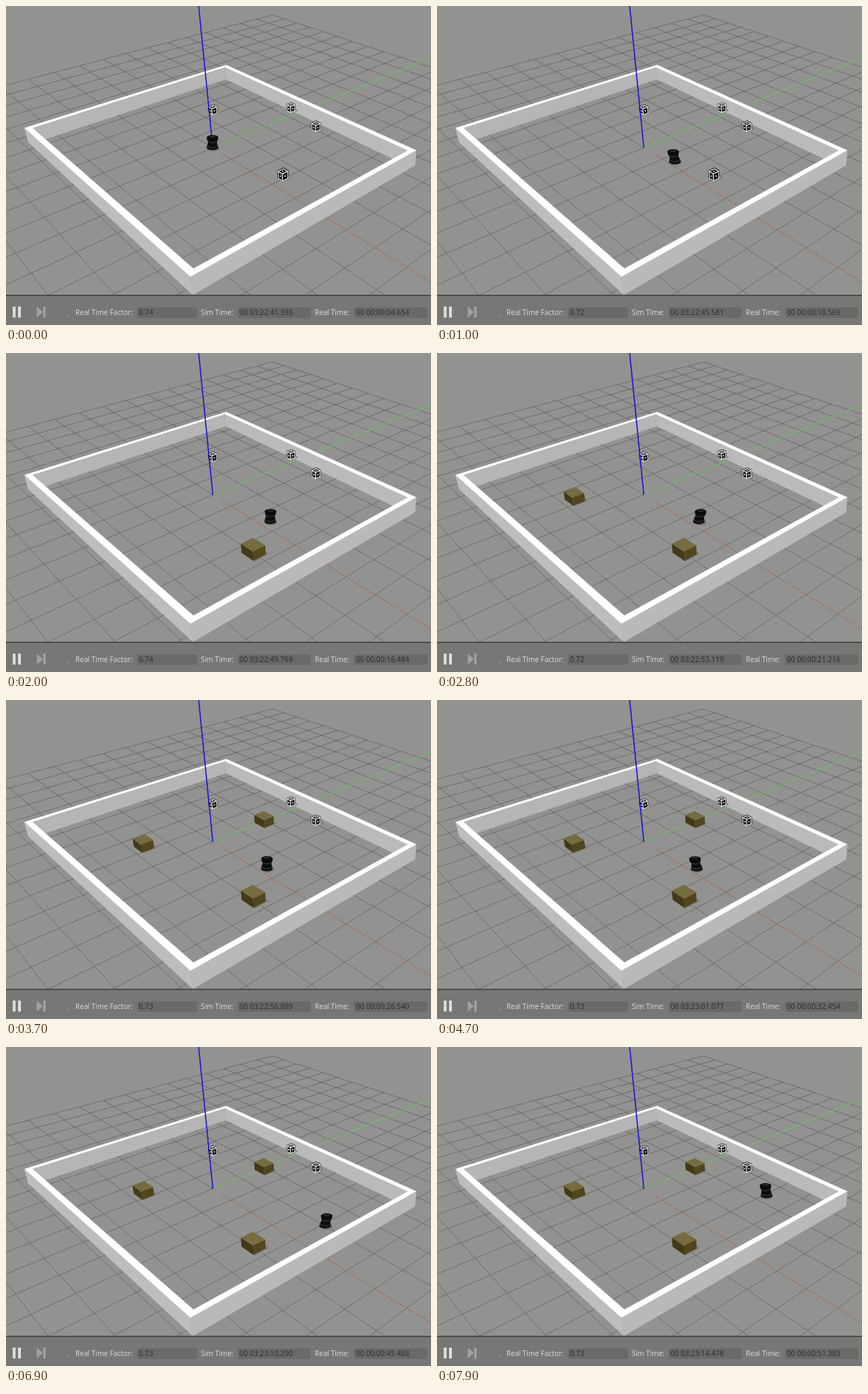
Write an HTML page with a canvas that moves like this. It is 600 px wide and 450 px high and loops after 8000 ms.

```html
<!DOCTYPE html>
<html lang="en">
<head>
<meta charset="utf-8">
<style>
html, body { margin: 0; width: 100%; height: 100%; overflow: hidden; background: #929290; }
canvas { display: block; }
</style>
</head>
<body>
<canvas id="stage" width="600" height="450"></canvas>
<script>
const ctx = document.getElementById('stage').getContext('2d');
const LOOP = 8000, STEP = 100;

// World metres to stage pixels: a perspective given by three vanishing points.
function project([x, y, z = 0]) {
  const p = -.0334 * x, q = .0352 * y, r = -.034 * z, w = 1 + p + q + r;
  return [
    (292 - 459 * p + 1407 * q + 450 * r) / w,
    (200 - 262 * p - 259 * q + 1780 * r) / w
  ];
}

function trace(points) {
  points.map(project).forEach(([x, y], i) => i ? ctx.lineTo(x, y) : ctx.moveTo(x, y));
}

function face(points, fill, edge) {
  ctx.beginPath();
  trace(points);
  ctx.closePath();
  ctx.fillStyle = fill;
  ctx.fill();
  if (edge) {
    ctx.strokeStyle = edge;
    ctx.lineWidth = 1.1;
    ctx.stroke();
  }
}

function line(color, width, ...points) {
  ctx.beginPath();
  trace(points);
  ctx.strokeStyle = color;
  ctx.lineWidth = width;
  ctx.stroke();
}

function ellipse(color, x, y, rx, ry) {
  ctx.fillStyle = color;
  ctx.beginPath();
  ctx.ellipse(x, y, rx, ry, 0, 0, 7);
  ctx.fill();
}

function rect(color, ...box) {
  ctx.fillStyle = color;
  ctx.fillRect(...box);
}

const ring = (x0, x1, y0, y1, z) => [[x0, y0, z], [x0, y1, z], [x1, y1, z], [x1, y0, z]];
const wallX = (x, y0, y1, z) => [[x, y0, 0], [x, y1, 0], [x, y1, z], [x, y0, z]];
const wallY = (y, x0, x1, z) => [[x0, y, 0], [x1, y, 0], [x1, y, z], [x0, y, z]];

function ground() {
  rect('#929290', 0, 0, 600, 450);
  for (let i = -10; i <= 10; i++) {
    if (!i) continue;
    line('#686867', .9, [i, -10], [i, 10]);
    line('#686867', .9, [-10, i], [10, i]);
  }
  line('#686867', .9, [-10, 0], [0, 0]);
  line('#686867', .9, [0, -10], [0, 0]);
  line('#6cbd66', 1.1, [0, 0], [0, 12]);
  ctx.setLineDash([3, 2]);
  line('#c04a47', 1, [.5, 0], [11, 0]);
  ctx.setLineDash([]);
}

function arena() {
  const x0 = -4.54, x1 = 5.25, y0 = -3.85, y1 = 3.56, z = .376, d = .18;
  face(wallX(x0 + d, y0 + d, y1 - d, z), '#b5b5b4');
  face(wallY(y1 - d, x0 + d, x1 - d, z), '#bababa');
  face(wallY(y0, x0, x1, z), '#bdbdbc');
  face(wallX(x1, y0, y1, z), '#b9b9b8');
  ctx.fillStyle = '#fff';
  ctx.beginPath();
  trace(ring(x0, x1, y0, y1, z));
  ctx.closePath();
  trace(ring(x0 + d, x1 - d, y0 + d, y1 - d, z));
  ctx.fill('evenodd');
}

// A block standing at x, y: left face, right face, top.
function block(x, y, length, width, height, colors, edge) {
  const x0 = x - length / 2, x1 = x + length / 2, y0 = y - width / 2, y1 = y + width / 2;
  face(ring(x0 + .08, x1 + .04, y0, y1 + .08, 0), '#7d7d7b');
  face(wallY(y0, x0, x1, height), colors[0], edge);
  face(wallX(x1, y0, y1, height), colors[1], edge);
  face(ring(x0, x1, y0, y1, height), colors[2], edge);
}

const crate = (x, y) => block(x, y, .53, .39, .21, ['#423918', '#51461f', '#776b40']);

function tagCube(x, y) {
  const size = .19, height = .17, m = .035;
  block(x, y, size + .04, size + .04, height + .02, ['#181818', '#181818', '#181818']);
  block(x, y, size, size, height, ['#151515', '#151515', '#151515'], '#e6e6e4');
  [[x, y, height], [x + size / 2, y, height / 2], [x, y - size / 2, height / 2]].forEach(p => {
    const [cx, cy] = project(p);
    ellipse('#d8d8d6', cx, cy, 30 * m, 30 * m);
  });
}

// time, x, y where the robot changes course
const route = [
  [0, 291.5, 193], [1900, 373.5, 231], [4700, 365.5, 231.5],
  [6300, 439, 249], [7200, 458, 244], [7900, 464.5, 203]
];

function robot(t) {
  const i = Math.max(1, route.findIndex(k => k[0] >= t));
  const a = route[i - 1], b = route[i], u = (t - a[0]) / (b[0] - a[0]);
  const x = a[1] + (b[1] - a[1]) * u, y = a[2] + (b[2] - a[2]) * u;
  const turn = t / 600;
  ellipse('#777775', x + 1, y + 8, 9, 4);
  for (let k = 0; k <= 6; k++) {
    const lean = 1.3 * Math.sin(turn) * Math.cos(k * Math.PI / 6);
    ellipse(k % 3 === 1 ? '#252525' : '#0c0c0c', x + lean, y + 6.5 - k * 2.3, 7.4 + .9 * Math.cos(k * Math.PI / 3), 3.8);
  }
  ellipse('#2a2a2a', x - 1.3 * Math.sin(turn), y - 8.5, 4.5, 1.3);
}

const two = n => String(Math.floor(n)).padStart(2, '0');
const clock = (hour, s) => `00 ${hour}:${two(s / 60)}:${(s % 60).toFixed(3).padStart(6, '0')}`;

function text(string, x, size, color) {
  ctx.font = `${size}px "Noto Sans", "Open Sans", sans-serif`;
  ctx.fillStyle = color;
  ctx.fillText(string, x, 436);
}

function reading(name, x, fieldX, width, value) {
  text(name, x, 10.05, '#d6d6d4');
  ctx.fillStyle = '#696967';
  ctx.beginPath();
  ctx.roundRect(fieldX, 425, width, 15, 3);
  ctx.fill();
  text(value, fieldX + 2.5, 10.25, '#2e2e2d');
}

function panel(t) {
  const s = t / 1000;
  rect('#777775', 0, 408, 600, 42);
  rect('#3d3d3c', 0, 407.5, 600, 1.5);
  rect('#dededc', 9.5, 424, 4, 15.5);
  rect('#dededc', 17, 424, 4, 15.5);
  rect('#a0a09e', 52.5, 424, 3.5, 15.5);
  ctx.beginPath();
  ctx.moveTo(43.5, 424);
  ctx.lineTo(52, 431.7);
  ctx.lineTo(43.5, 439.5);
  ctx.fill();
  rect('#a8a8a6', 86, 436, 3, 1);
  reading('Real Time Factor:', 98, 185, 85, (.73 + .014 * Math.cos(3 * s)).toFixed(2));
  reading('Sim Time:', 275, 327, 103, clock('03', 22 * 60 + 41.393 + 4.188 * s));
  reading('Real Time:', 436, 491.5, 103.5, clock('00', 4.654 + 5.915 * s));
}

function render(t) {
  ground();
  arena();
  tagCube(-2.12, 1.37);
  tagCube(-.29, 3.36);
  tagCube(1.42, 3.02);
  if (t < 1600) tagCube(2.98, .41);
  line('#1814d8', 1.6, [0, 0, 0], [0, 0, 3.4]);
  if (t >= 3200) crate(.16, 1.86);
  if (t >= 2300) crate(-1.22, -1.65);
  robot(t);
  if (t >= 1600) crate(3.51, -1);
  panel(t);
}

const start = performance.now();
function tick() {
  const t = (performance.now() - start) % LOOP;
  render(Math.floor(t / STEP) * STEP);
  requestAnimationFrame(tick);
}
tick();
</script>
</body>
</html>
```
